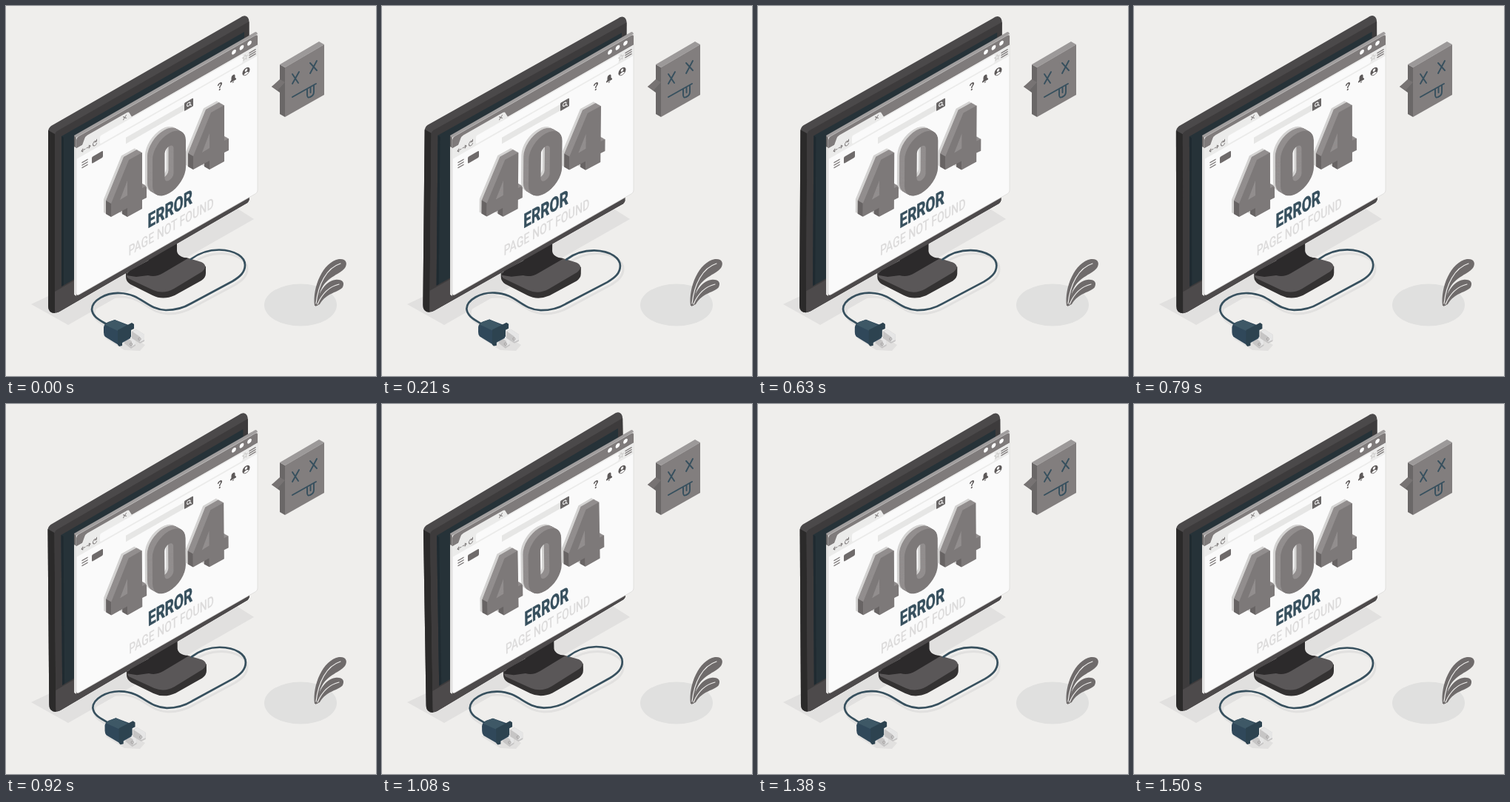
Animation, 500 px wide and 500 px high, one loop 1540 ms. Source, as an HTML page:

```html
<!DOCTYPE html>
<html lang="en">
<head>
<meta charset="utf-8">
<title>404</title>
<style>
html, body { margin: 0; width: 100%; height: 100%; overflow: hidden; background: #efeeec; }
svg { display: block; width: 100vw; height: 100vh; }
text { font-family: Roboto, Arial, sans-serif; }
.line { fill: none; stroke-linecap: round; stroke-linejoin: round; }
</style>
</head>
<body>
<svg viewBox="0 0 500 500">
  <defs>
    <path id="cord" d="M250 342C262 333 273 329.500 288 329.500C311 330 323 340 323 350C323 360 316 366 306 372L250 402C240 408 230 411 216 411C190 410 183 389 154 388C135 387 116 398 116 410C117 420 126 424 136 430"/>
    <path id="four" fill-rule="evenodd" d="M277 144L295 134V182L301 179V195L295 198V210L275 221V209L253 221V203ZM275 172L265 198L275 192Z"/>
    <path id="zero" fill-rule="evenodd" transform="matrix(1 -.57 0 1 220.5 212.5)" d="M-22.5 -18a22.5 22.5 0 0 1 45 0V18a22.5 22.5 0 0 1 -45 0ZM-6 -17V17a6 6 0 0 0 12 0V-17a6 6 0 0 0 -12 0Z"/>
  </defs>

  <!-- floor -->
  <path fill="#e1e0df" d="M34 403L84 431L335 288L310 272Z"/>
  <use href="#cord" class="line" stroke="#e1e0df" stroke-width="3" x="3" y="5"/>
  <path fill="#e1e0df" d="M134 449L160 465L181 466L188 458L165 444Z"/>
  <ellipse cx="398" cy="404" rx="49" ry="28.5" fill="#e0e0df"/>

  <!-- leaves -->
  <path fill="#6f6b6b" d="M417 405C414 380 428 346 450 342C460 341 462 348 458 354C450 364 431 366 424 388L421 405Z"/>
  <path fill="#6f6b6b" d="M418 406C422 390 430 372 445 370C455 369 458 374 455 380C450 387 433 387 424 403Z"/>
  <path class="line" stroke="#efeeec" stroke-width="1.2" d="M419 402C422 376 433 354 452 348M421 403C427 389 437 379 450 376"/>

  <!-- talking cube -->
  <path fill="#6a6767" d="M370 79L377 83V150L370 146V117L359 109L370 101Z"/>
  <path fill="#777373" d="M359 109L370 99L377 103L367 114Z"/>
  <path fill="#9c9999" d="M370 79L423 48L430 52L377 83Z"/>
  <path fill="#827e7e" d="M377 83L430 52V120L377 150Z"/>
  <path class="line" stroke="#37505e" stroke-width="1.9" d="M387 92L395 104M396 89L387 105M411 77L420 87M420 74L411 91M387 123L419 105M407 112V120Q407 125 411 123Q416 121 416 116V107M411.500 110V117"/>

  <g class="sway">
    <!-- stand -->
    <path fill="#343232" d="M162 361V366Q162 372 168 376L198 391Q212 398 228 391L264 371Q270 367 270 361V352L220 340Z"/>
    <path fill="#5a5758" d="M165 368Q160 363 167 358L230 333Q233 341 244 340L264 346Q274 351 265 359L227 382Q213 390 199 384Z"/>
    <path fill="#2c2a2b" d="M196 338L231 316V331Q232 339 246 341L212 361Q202 367 192 364L176 366L163 364Q164 360 168 357L192 344Z"/>

    <!-- monitor -->
    <path fill="#4b494a" d="M57 170Q57 165 61 162L316 16Q321 12 325 14Q328.500 16 328.500 22V262Q328 264 326 266L72 413Q65 417 60 413Q57 411 57 406Z"/>
    <path fill="#2b2a2a" d="M57 168L66 173V415Q57 415 57 405Z"/>
    <path fill="#3d3b3c" d="M66 174Q66 171 69 169L328.500 21V262Q328 264 326 266L72 413Q66 416 66 410Z"/>
    <path fill="#4d4a4b" d="M66 386L328.500 236V262Q328 264 326 266L72 413Q66 416 66 410Z"/>
    <path fill="#263238" d="M75 176L322 35V237L75 379Z"/>
    <path fill="#1f2a30" d="M75 176L78 178V377L75 379Z"/>

    <!-- cord and plug -->
    <use href="#cord" class="line" stroke="#37505e" stroke-width="2.7"/>
    <path fill="#c6c5c5" d="M160 446L165 443L175 450V459L169 463L160 456Z"/>
    <path fill="#e6e6e6" d="M160 446L165 443L175 450V457L170 460V453Z"/>
    <path fill="#c6c5c5" d="M170 440L176 437L187 444V453L181 456L170 449Z"/>
    <path fill="#e6e6e6" d="M171 440L176 437L187 444V451L181 454V447Z"/>
    <g fill="none" stroke="#a3a1a1" stroke-width=".9"><circle cx="169" cy="457" r="1.7"/><circle cx="180.500" cy="450" r="1.7"/></g>
    <path fill="#30485a" d="M132 434Q133 429 138 427L147 424L168 432V449L152 458L134 447Q132 445 132 441Z"/>
    <path fill="#3e5866" d="M134 431Q136 428 139 427L147 424L164 432L151 439Z"/>
    <path fill="#2d4350" d="M151 438L170 428L173 430V436L169 438V447L157 454V459L153 460L151 458Z"/>
  </g>

  <!-- browser window -->
  <path fill="#e3e2e1" d="M92 175L95 178V392L92 390Z"/>
  <path fill="#6a6767" d="M92 175L97 178V193L92 190Z"/>
  <path fill="#a09d9d" d="M92 175L337 35Q340 35 340 39L95 179Z"/>
  <g transform="matrix(1 -.571 0 1 95 178)">
    <path fill="#fafafa" stroke="#dcdbda" stroke-width=".7" d="M0 0H245V211Q245 214 242 214H4Q0 214 0 210Z"/>
    <path fill="#7f7b7b" d="M0 3Q0 0 3 0H242Q245 0 245 3V14.500H0Z"/>
    <path fill="#ebebea" d="M0 14.500H8L11 8Q12 5 15 5H68Q71 5 72 8L75 14.500H245V29H0Z"/>
    <rect x="32" y="16" width="193" height="11" rx="2" fill="#fafafa"/>
    <g fill="#fff"><circle cx="213" cy="5.800" r="2.900"/><circle cx="223.500" cy="5.800" r="2.900"/><circle cx="234" cy="5.800" r="2.900"/></g>
    <g class="line" stroke="#7f7b7b" stroke-width="1">
      <path d="M63.500 8L67.500 12M67.500 8L63.500 12"/>
      <path d="M12 22H7M9 20L7 22L9 24M14 22H19M17 20L19 22L17 24M27 20A2.600 3 0 1 0 27.500 23M27.500 18V20.500H25"/>
      <path stroke-width="1.500" d="M234 19H242M234 22H242M234 25H242M8 38H15M8 41.500H15M8 45H15"/>
      <path stroke="#cfcecd" d="M228 18L229 20.500H231.500L229.500 22L230 25L228 23.300L226 25L226.500 22L224.500 20.500H227Z"/>
    </g>
    <g transform="translate(0 1.500)">
      <rect x="21" y="36.500" width="15" height="9" rx="1.500" fill="#6f6b6b"/>
      <rect x="67" y="36.500" width="79" height="8.500" fill="#e6e6e5"/>
      <rect x="146" y="35" width="12" height="11" rx="1" fill="#6a6767"/>
      <path class="line" stroke="#fff" d="M153.500 41.500L155.500 43.500M154 40a2.200 2.200 0 1 0 -4.400 0a2.200 2.200 0 1 0 4.400 0"/>
      <g fill="#5d5959">
        <text x="194" y="45" font-size="14" font-weight="700" text-anchor="middle">?</text>
        <path d="M208 43V41.500L209.500 40V37Q209.500 34.500 212 34.500Q214.500 34.500 214.500 37V40L216 41.500V43ZM210.500 44H213.500Q212 46.500 210.500 44Z"/>
        <circle cx="229.500" cy="40" r="5"/>
      </g>
      <path fill="#fafafa" d="M231.300 38.300a1.800 1.800 0 1 0 -3.600 0a1.800 1.800 0 1 0 3.600 0M226 43Q229.500 39 233 43Q229.500 45.500 226 43Z"/>
    </g>
  </g>

  <g class="sway">
    <g id="digits"></g>
    <text transform="matrix(.72 -.41 0 1 191.5 300.5)" font-size="26.500" font-weight="700" fill="#37505e" stroke="#37505e" stroke-width=".6">ERROR</text>
    <text transform="matrix(.725 -.414 0 1 165.5 338)" font-size="19.500" font-weight="500" fill="#dcdbdb">PAGE NOT FOUND</text>
  </g>
</svg>
<script>
const DEPTH = 7, SHADE = 10, RISE = 4 / 7;
const glyphs = [["four", -111, 64], ["zero", 0, 0], ["four", 0, 0]];
const use = (id, x, y, fill) => `<g transform="translate(${x} ${y})"><use href="#${id}" fill="${fill}"/></g>`;

// Each digit is a stack of copies receding up and to the left, ending in a pale cast shade.
function solid([id, x, y]) {
  let out = "";
  for (let d = SHADE; d > 0; d -= 0.5) {
    out += use(id, x - d, y - d * RISE, d > DEPTH ? "#d3d2d1" : "#928e8e");
  }
  if (id === "four") {
    out += `<path transform="translate(${x} ${y})" fill="#686464" d="M246 199L253 203V221L246 217ZM268 212L275 208V221L268 217Z"/>`;
  }
  return out + use(id, x, y, "#7d7979");
}
document.getElementById("digits").innerHTML = glyphs.map(solid).join("");

const LOOP = 1540, SWING = 1500, FPS = 24;
const swayers = document.querySelectorAll(".sway");

// Linear swing 0 -> 1 -> -1 -> 0 degrees.
function angle(p) {
  if (p < 0.25) return p * 4;
  return p < 0.75 ? 2 - p * 4 : p * 4 - 4;
}

const start = performance.now();
function draw(now) {
  const t = Math.max(0, now - start) % LOOP;
  const step = Math.floor(t * FPS / 1000 + 0.1);
  const a = angle(Math.min(1, step * 1000 / FPS / SWING));
  for (const g of swayers) g.setAttribute("transform", `rotate(${a} 193 237)`);
  requestAnimationFrame(draw);
}
draw(start);
</script>
</body>
</html>
```
